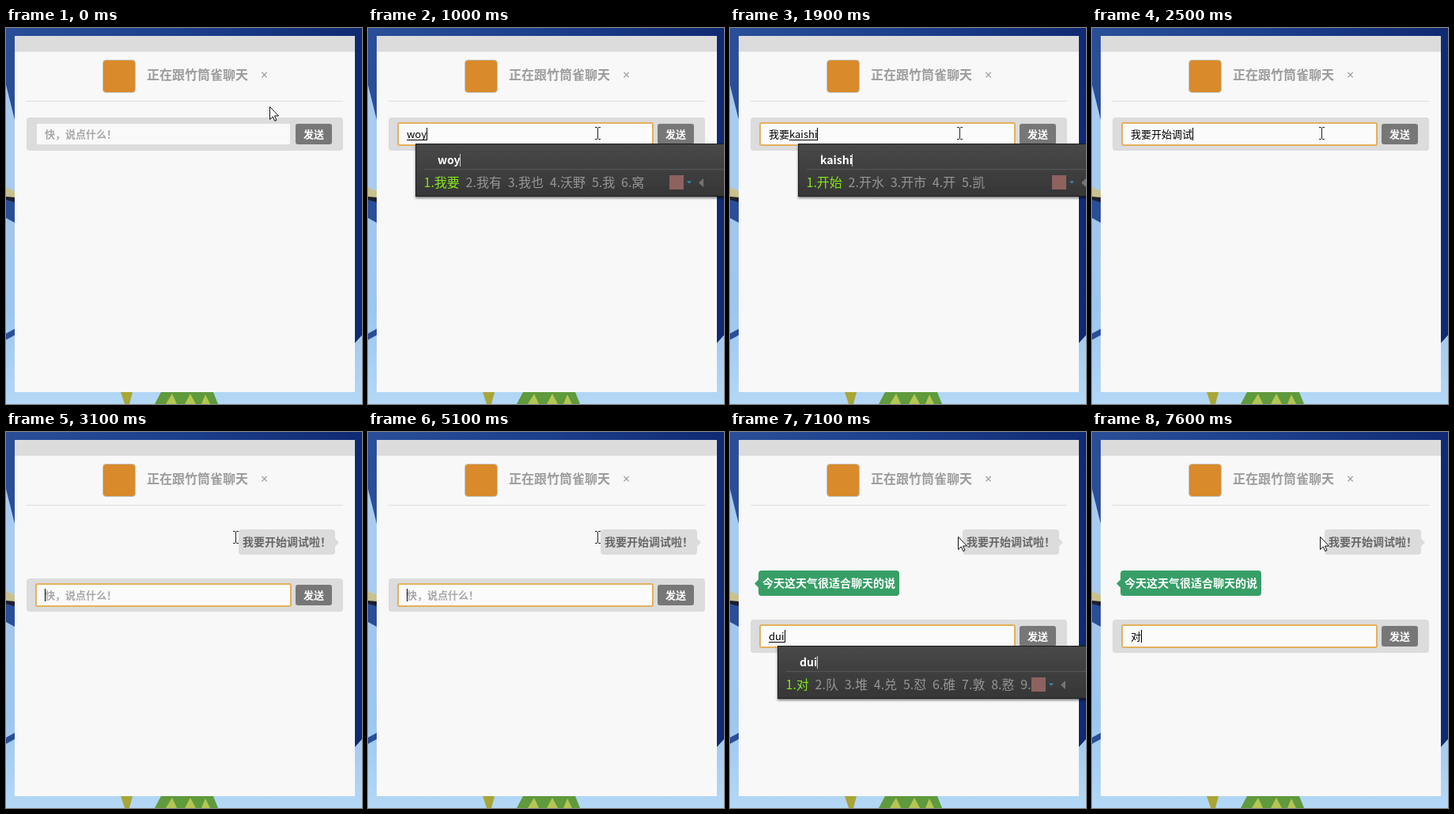
Animation, 450 px wide and 475 px high, one loop 8 s. Source, as an HTML page:

```html
<!DOCTYPE html>
<html lang="zh-CN">
<head>
<meta charset="utf-8">
<style>
  html, body { margin: 0; width: 100%; height: 100%; overflow: hidden; }
  svg { display: block; font: 13px "Noto Sans CJK SC", "Noto Sans CJK", sans-serif; }
  text { white-space: pre; }
  .bold { font-weight: bold; }
  .title { font-size: 16px; fill: #9c9c9c; }
  .bubble { font-size: 14px; }
  .hint { fill: #a8a8a8; }
  .cand { font-size: 16px; fill: #969696; }
  .cand :first-child { fill: #84e61c; }
</style>
</head>
<body>
<svg width="450" height="475" viewBox="0 0 450 475">
  <defs>
    <linearGradient id="sky">
      <stop offset="0" stop-color="#2a4f98"/>
      <stop offset=".5" stop-color="#1c3f8c"/>
      <stop offset="1" stop-color="#0f2a72"/>
    </linearGradient>
    <linearGradient id="petal" x2="0" y2="1">
      <stop offset="0" stop-color="#a3c6ec"/>
      <stop offset=".5" stop-color="#9cc6ee"/>
      <stop offset="1" stop-color="#b4d8f6"/>
    </linearGradient>
    <linearGradient id="dark" x2="0" y2="1">
      <stop offset="0" stop-color="#484848"/>
      <stop offset="1" stop-color="#363636"/>
    </linearGradient>
    <filter id="shadow" x="-5%" y="-10%" width="110%" height="130%">
      <feDropShadow dx="0" dy="2" stdDeviation="1.5" flood-opacity=".5"/>
    </filter>
  </defs>

  <!-- blurred flower backdrop -->
  <rect width="450" height="475" fill="url(#sky)"/>
  <path d="M0 72L11 116V212L0 204Z" fill="#a9cbef"/>
  <path d="M0 201L11 206V214H0Z" fill="#c9c28e"/>
  <path d="M0 213L11 214V220L0 217Z" fill="#1d1f2c"/>
  <path d="M0 240L11 246V380L0 386ZM0 394L11 388V460H441V398L450 388V475H0Z" fill="url(#petal)"/>
  <path d="M145 460H160L156 475H150Z" fill="#a9a536"/>
  <path d="M188 475L196 460H262L268 475Z" fill="#5f9a3c"/>
  <path d="M202 475L210 462 216 475ZM226 475L233 462 240 475ZM247 475L252 463 258 475Z" fill="#b4c653"/>

  <rect x="11" y="10" width="430" height="450" fill="#f8f8f8"/>
  <rect x="11" y="10" width="430" height="20" fill="#dcdcdc"/>
  <rect x="122.5" y="40.5" width="41" height="41" rx="4" fill="#d98a2a" stroke="#c4c4c4"/>
  <text class="title bold" x="178" y="64.5">正在跟竹筒雀聊天</text>
  <text x="322" y="64.5" font-family="Noto Sans, sans-serif" font-size="16" fill="#999">×</text>
  <rect x="26" y="92" width="400" height="1" fill="#dcdcdc"/>

  <g id="mine" class="bubble bold">
    <path d="M416 134.5L421 139.5 416 144.5Z" fill="#dcdcdc"/>
    <rect x="294" y="123" width="122" height="32" rx="4" fill="#dcdcdc"/>
    <text x="299" y="144" fill="#666">我要开始调试啦！</text>
  </g>
  <g id="reply" class="bubble bold" fill="#379f66">
    <path d="M36 186.500L31 191.500 36 196.500Z"/>
    <rect x="36" y="175" width="178" height="32" rx="4"/>
    <text x="41" y="196" fill="#fff">今天这天气很适合聊天的说</text>
  </g>

  <g id="composer">
    <rect x="26" y="113" width="400" height="42" rx="4" fill="#dcdcdc"/>
    <rect x="39" y="121" width="320" height="26" rx="1" fill="#f9f9f9"/>
    <rect id="focus" x="38" y="120" width="322" height="28" rx="2" fill="#fbfbfb" stroke="#e3b15c" stroke-width="2"/>
    <rect x="366" y="121" width="46" height="26" rx="3" fill="#777"/>
    <text class="bold" x="376" y="139" fill="#fff">发送</text>
    <text id="hint" class="hint bold" x="49" y="139">快，说点什么！</text>
    <text id="typed" x="49" y="139"></text>
    <rect id="underline" y="141" height="1"/>
    <rect id="caret" y="126" width="1" height="16"/>
    <g id="ime">
      <rect x="-.5" y="146.500" width="400" height="66" fill="url(#dark)" stroke="#1c1c1c" filter="url(#shadow)"/>
      <rect x="10" y="178" width="380" height="1" fill="#565656"/>
      <text id="pinyin" class="bold" x="27" y="172" font-size="14" fill="#fff"></text>
      <rect id="imeCaret" y="159" width="1" height="16" fill="#ccc"/>
      <text id="cands" class="cand"></text>
      <rect x="320" y="186" width="18" height="18" fill="#8e625f"/>
      <path d="M342 193.500H348L345 196.500Z" fill="#3b8fc0"/>
      <path d="M357 195.500L363 190V201Z" fill="#747474"/>
    </g>
  </g>

  <path id="arrow" d="M.5 .5V16.500L4.300 13 6.800 18.500 9 17.500 6.500 12H11.500Z" fill="#fff" stroke="#111"/>
  <path id="beam" d="M287 125.500H289.500L290.500 126.500 291.500 125.500H294M290.500 126V140M287 140.500H289.500L290.500 139.500 291.500 140.500H294" fill="none" stroke="#222"/>
</svg>
<script>
const $ = id => document.getElementById(id);
const show = (id, on) => $(id).setAttribute('visibility', on ? 'visible' : 'hidden');
const put = (id, attrs) => { for (const k in attrs) $(id).setAttribute(k, attrs[k]); };
const move = (id, x, y) => put(id, { transform: `translate(${x} ${y})` });

// time, committed text, pinyin being composed
const steps = [
  [0, ''], [800, '', 'w'], [900, '', 'wo'], [1000, '', 'woy'], [1100, '', 'woya'], [1200, '', 'woyao'],
  [1300, '我要'], [1400, '我要', 'k'], [1500, '我要', 'ka'], [1600, '我要', 'kai'],
  [1700, '我要', 'kais'], [1800, '我要', 'kaish'], [1900, '我要', 'kaishi'],
  [2000, '我要开始'], [2100, '我要开始', 't'], [2200, '我要开始', 'tiaos'], [2300, '我要开始', 'tiaoshi'],
  [2500, '我要开始调试'], [2600, '我要开始调试', 'la'], [2700, '我要开始调试啦！'],
  [3000, ''], [6900, '', 'd'], [7000, '', 'du'], [7100, '', 'dui'], [7400, '对']
];
const words = {
  w: '我 为 无 万 问 完 网 玩 往', wo: '我 窝 握 卧 沃 喔 涡 蜗 斡', woy: '我要 我有 我也 沃野 我 窝',
  k: '看 快 卡 开 可 靠 块 空 口', ka: '卡 咖 喀 咯 咔 佧 胩 看 开', kai: '开 凯 楷 慨 揩 铠 恺 锴 垲',
  kais: '开始 开水 开市 开 凯', t: '他 她 天 听 太 同 头 图 条', tiaos: '调试 跳水 挑食 条 跳',
  la: '啦 拉 辣 蜡 腊 喇 垃 落 剌', d: '的 到 大 都 多 点 对 等 当', du: '都 读 度 毒 独 堵 渡 肚 赌',
  dui: '对 队 堆 兑 怼 碓 敦 憝 镦'
};

// longest known prefix of the pinyin
function lookup(pinyin) {
  while (!words[pinyin]) pinyin = pinyin.slice(0, -1);
  return words[pinyin].split(' ');
}

function drawIme(start, pinyin) {
  move('ime', start + 12, 0);
  $('pinyin').textContent = pinyin;
  put('imeCaret', { x: Math.floor(27 + $('pinyin').getComputedTextLength()) });
  let x = 9.5;
  $('cands').innerHTML = lookup(pinyin).map((word, i) => {
    const span = `<tspan x="${x}" y="201">${i + 1}.${word}</tspan>`;
    x += 21.100 + 16 * word.length;
    return span;
  }).join('');
}

const blinkOff = [[3600, 4100], [4600, 5100], [5900, 6300], [6800, 6900]];
let last;

function drawInput(step) {
  const [, text, pinyin = ''] = step;
  const start = 49 + text.length * 13;
  $('typed').textContent = text + pinyin;
  const end = text || pinyin ? Math.round(49 + $('typed').getComputedTextLength()) : 49;
  put('underline', { x: start, width: pinyin ? end - start : 0 });
  put('caret', { x: end });
  show('hint', !text && !pinyin);
  if (pinyin) drawIme(start, pinyin);
}

function frame() {
  const t = performance.now() % 8000;
  const step = steps.findLast(s => s[0] <= t);
  if (step !== last) drawInput(last = step);

  const closing = t >= 7400 && t < 7600;
  if (closing) drawIme(49, 'dui');
  show('ime', step[2] || closing);
  put('ime', { opacity: closing ? (t < 7500 ? .7 : .35) : 1 });

  move('composer', 0, t < 3000 ? 0 : t < 5400 ? 72 : 124);
  show('mine', t >= 3000);
  put('mine', { opacity: t < 3100 ? .5 : 1 });
  show('reply', t >= 5400);

  show('focus', t >= 300);
  show('caret', t >= 300 && !blinkOff.some(([a, b]) => t >= a && t < b));

  const beam = t >= 200 && t < 6800;
  show('beam', beam);
  show('arrow', !beam);
  if (t < 100) move('arrow', 333, 99);
  else if (t < 200) move('arrow', 308, 118);
  else move('arrow', 288, 132);

  requestAnimationFrame(frame);
}
frame();
</script>
</body>
</html>
```
